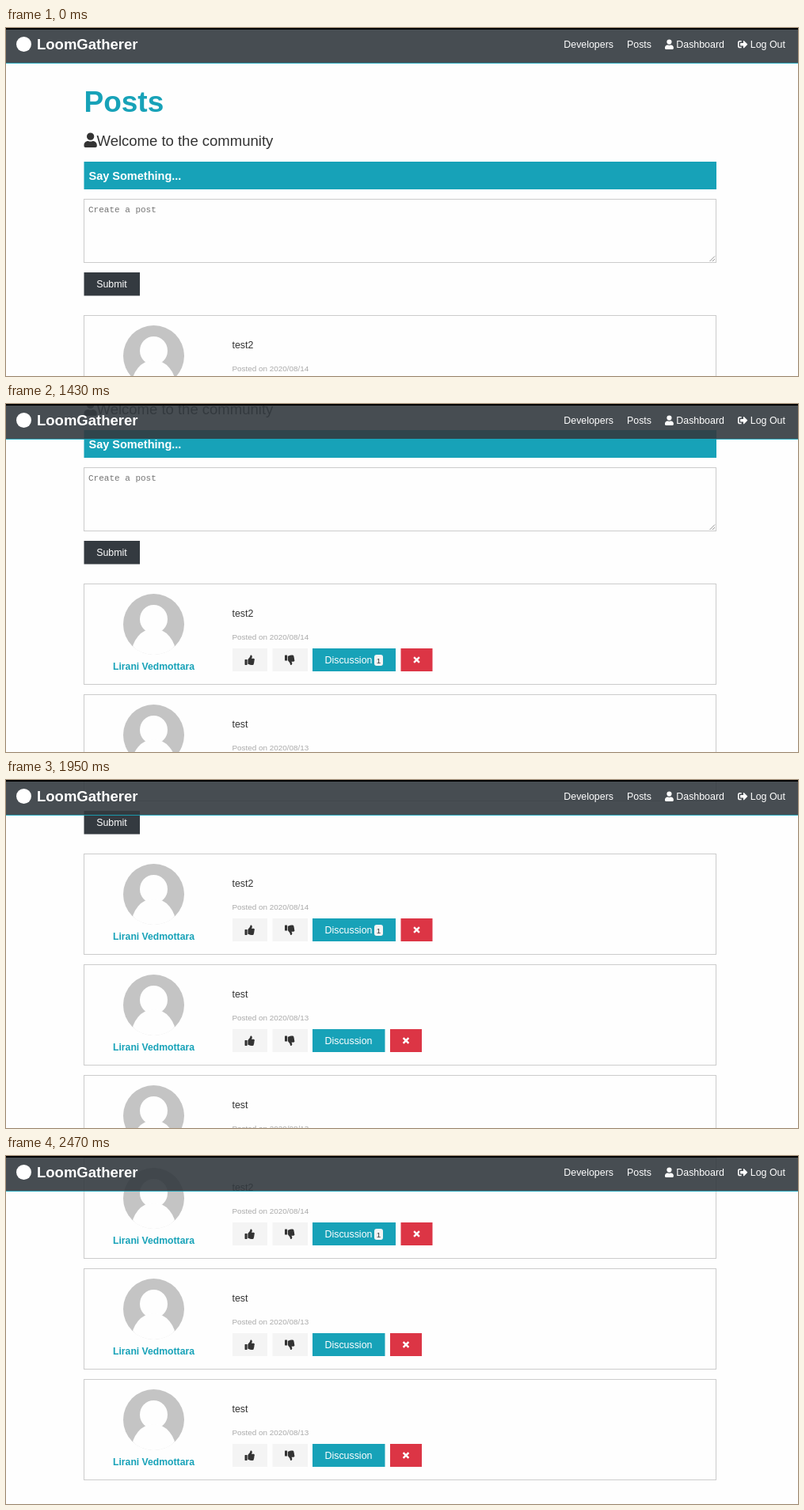
Animation, 1000 px wide and 440 px high, one loop 5.46 s. Source, as an HTML page with a canvas:

```html
<!DOCTYPE html>
<html lang="en">
<head>
<meta charset="utf-8">
<title>Posts</title>
<style>
  html, body { margin: 0; width: 100%; height: 100%; overflow: hidden; background: #fefefe; }
  canvas { display: block; width: 100vw; height: 100vh; }
</style>
</head>
<body>
<canvas id="stage" width="1000" height="440"></canvas>
<script>
const ctx = document.getElementById('stage').getContext('2d');

const LOOP = 5460, SCROLL_START = 1170, STEP = 130;
// Page offset after each scroll step
const OFFSETS = [18, 82, 136, 174, 209, 240, 270, 290, 310, 330, 361];

const PAGE = '#fefefe', TEAL = '#17a2b8', DARK = '#343a40', INK = '#333',
      LIGHT = '#f4f4f4', RED = '#dc3545', LINE = '#ccc', WHITE = '#fff';
const SANS = '"Liberation Sans", Arial, sans-serif';
const MONO = '"Liberation Mono", monospace';

const POSTS = [
  { text: 'test2', date: '2020/08/14', comments: 1 },
  { text: 'test', date: '2020/08/13', comments: 0 },
  { text: 'test', date: '2020/08/13', comments: 0 }
];
const AUTHOR = 'Lirani Vedmottara';

// Icons on a 512-unit grid
const USER = new Path2D('M224 256a128 128 0 1 0 0-256a128 128 0 0 0 0 256z' +
  'M314 288h-17a175 175 0 0 1-146 0h-17C60 288 0 348 0 422v42c0 26 22 48 48 48h352' +
  'c26 0 48-22 48-48v-42c0-74-60-134-134-134z');
const EXIT = new Path2D('M497 273L329 441c-15 15-41 4-41-17v-96H152c-13 0-24-11-24-24v-96' +
  'c0-13 11-24 24-24h136V88c0-21 26-32 41-17l168 168c9 9 9 25 0 34z' +
  'M192 436v-40q0-12-12-12H96c-18 0-32-14-32-32V160c0-18 14-32 32-32h84q12 0 12-12V76' +
  'q0-12-12-12H96c-53 0-96 43-96 96v192c0 53 43 96 96 96h84q12 0 12-12z');
const THUMB = new Path2D('M24 224h80q24 0 24 24v240q0 24-24 24H24q-24 0-24-24V248q0-24 24-24z' +
  'M312 0c24 0 72 8 72 81c0 43-26 67-33 95h101c34 0 60 28 60 58c0 18-8 37-20 49' +
  'c10 24 9 56-9 80c9 26 0 58-16 75c4 17 2 32-6 44c-21 30-71 30-114 30' +
  'c-51 0-91-18-123-32c-16-7-37-16-52-16q-12 0-12-12V238q0-5 4-8' +
  'c39-39 56-81 89-113c15-15 20-38 25-59C282 39 292 0 312 0z');

function text(str, x, y, size, color, { bold = false, align = 'left', family = SANS } = {}) {
  ctx.font = `${bold ? 'bold ' : ''}${size}px ${family}`;
  ctx.textAlign = align;
  ctx.fillStyle = color;
  ctx.fillText(str, x, y);
}

function rect(x, y, w, h, color) {
  ctx.fillStyle = color;
  ctx.fillRect(x, y, w, h);
}

function outline(y, h) {
  ctx.strokeStyle = LINE;
  ctx.lineWidth = 1;
  ctx.strokeRect(98.5, y + 0.5, 798, h);
}

function shape(color, build) {
  ctx.fillStyle = color;
  ctx.beginPath();
  build();
  ctx.fill();
}

function disc(x, y, r, color) {
  shape(color, () => ctx.arc(x, y, r, 0, Math.PI * 2));
}

function icon(path, x, y, size, color, flip = false) {
  const k = size / 512;
  ctx.save();
  ctx.translate(x, flip ? y + size : y);
  ctx.scale(k, flip ? -k : k);
  ctx.fillStyle = color;
  ctx.fill(path);
  ctx.restore();
}

function lines(color, width, segments) {
  ctx.strokeStyle = color;
  ctx.lineWidth = width;
  ctx.beginPath();
  for (const [x1, y1, x2, y2] of segments) {
    ctx.moveTo(x1, y1);
    ctx.lineTo(x2, y2);
  }
  ctx.stroke();
}

function avatar(x, y) {
  ctx.save();
  ctx.beginPath();
  ctx.arc(x, y, 38.5, 0, Math.PI * 2);
  ctx.clip();
  rect(x - 39, y - 39, 78, 78, '#c4c4c4');
  shape(PAGE, () => ctx.ellipse(x, y - 6.5, 17.5, 18, 0, 0, Math.PI * 2));
  shape(PAGE, () => ctx.ellipse(x, y + 38.5, 28, 33, 0, 0, Math.PI * 2));
  // The shoulders run out of the disc
  rect(x - 39, y + 29.5, 78, 10, PAGE);
  ctx.restore();
}

function card(post, y) {
  outline(y, 127);
  avatar(186.5, y + 51.5);
  text(AUTHOR, 186.5, y + 109, 12.2, TEAL, { bold: true, align: 'center' });
  text(post.text, 285.5, y + 42, 12.4, INK);
  text('Posted on ' + post.date, 285.5, y + 71, 9.9, '#aaa');

  const top = y + 82;
  rect(286, top, 44, 29, LIGHT);
  icon(THUMB, 301.5, top + 8.5, 12.4, INK);
  rect(336.5, top, 44.5, 29, LIGHT);
  icon(THUMB, 352, top + 8.5, 12.4, INK, true);

  const width = post.comments ? 105 : 91.5;
  rect(387, top, width, 29, TEAL);
  text('Discussion', 402.5, y + 101, 12.4, WHITE);
  if (post.comments) {
    shape(LIGHT, () => ctx.roundRect(465, y + 90, 11, 14, 3));
    text(post.comments, 470.5, y + 101, 9.9, INK, { align: 'center' });
  }

  const left = 387 + width + 6.5;
  rect(left, top, 40, 29, RED);
  const cx = left + 20, cy = top + 14.5, r = 3.4;
  lines(WHITE, 2.4, [[cx - r, cy - r, cx + r, cy + r], [cx - r, cy + r, cx + r, cy - r]]);
}

function page() {
  text('Posts', 98.5, 106, 37, TEAL, { bold: true });
  icon(USER, 98.5, 132.5, 18.6, INK);
  text('Welcome to the community', 114.5, 149, 18.5, INK);

  rect(98.5, 169, 798.5, 35, TEAL);
  text('Say Something...', 104.5, 192, 14.5, WHITE, { bold: true });

  outline(216, 80);
  text('Create a post', 104, 233, 11, '#757575', { family: MONO });
  lines('#888', 0.9, [[888.5, 295, 895, 288.5], [892, 295, 895, 292]]);

  rect(98.5, 309, 70.5, 29.5, DARK);
  text('Submit', 114.2, 328, 12.4, WHITE);

  POSTS.forEach((post, i) => card(post, 363 + i * 140));
}

function navbar() {
  rect(0, 2, 1000, 42, 'rgba(52, 58, 64, 0.9)');
  rect(0, 44, 1000, 1, 'rgba(23, 162, 184, 0.9)');
  rect(0, 0, 1000, 2, '#000');

  disc(22.5, 20.5, 9.5, WHITE);
  text('LoomGatherer', 39, 27, 18.5, WHITE, { bold: true });
  text('Developers', 704.3, 25, 12.4, WHITE);
  text('Posts', 784, 25, 12.4, WHITE);
  icon(USER, 832, 14.5, 12.4, WHITE);
  text('Dashboard', 846.3, 25, 12.4, WHITE);
  icon(EXIT, 924, 14.5, 12.4, WHITE);
  text('Log Out', 939.8, 25, 12.4, WHITE);
}

function scrollAt(t) {
  if (t < SCROLL_START) return 0;
  const step = Math.floor((t - SCROLL_START) / STEP);
  return OFFSETS[Math.min(step, OFFSETS.length - 1)];
}

function draw(t) {
  rect(0, 0, 1000, 440, PAGE);
  ctx.save();
  ctx.translate(0, -scrollAt(t));
  page();
  ctx.restore();
  navbar();
}

const start = performance.now();
function tick() {
  draw((performance.now() - start) % LOOP);
  requestAnimationFrame(tick);
}
tick();
</script>
</body>
</html>
```
